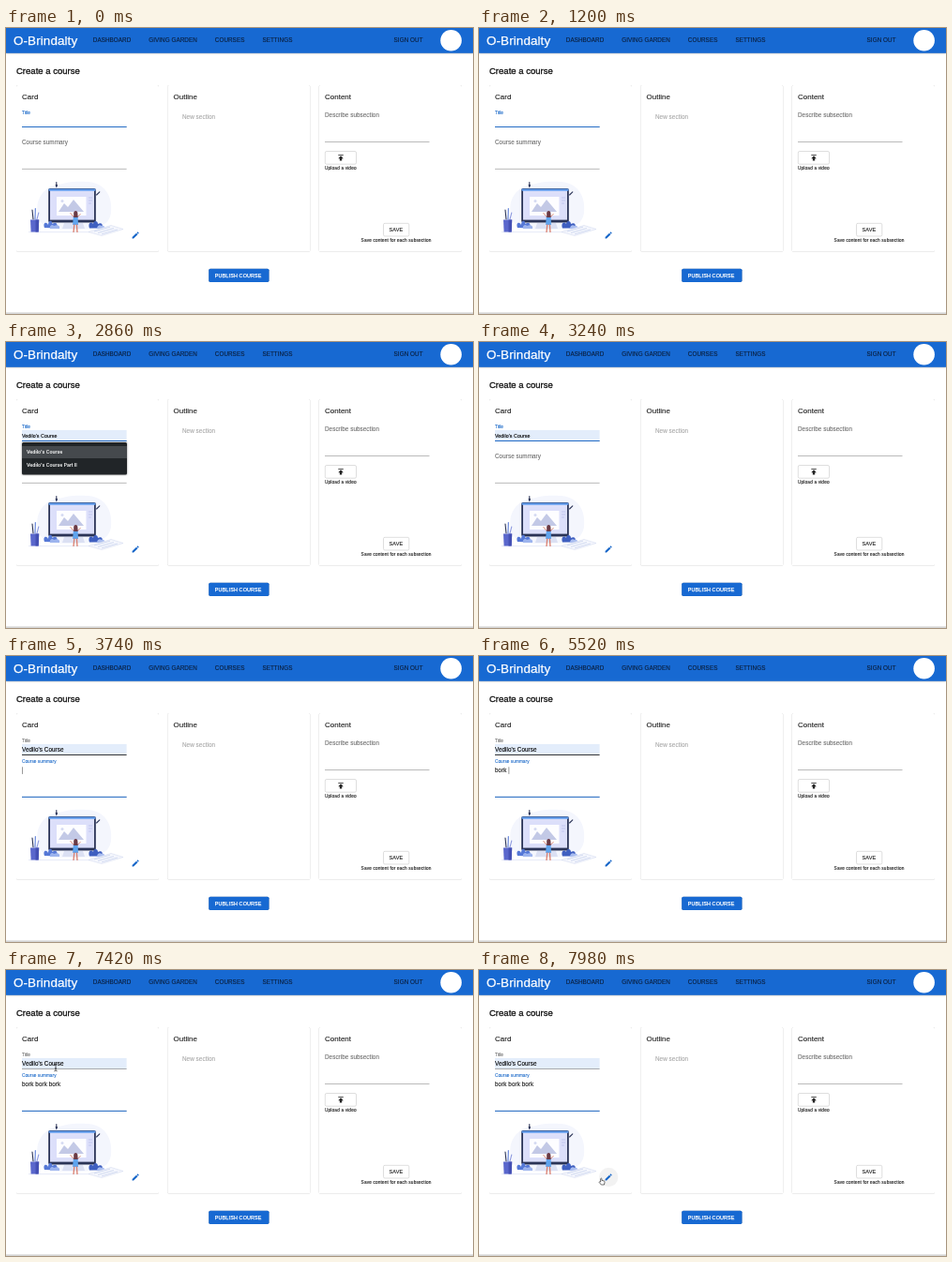
Recreate the animation shown at these times as an HTML page. Size 498 by 305 pixels, loop 8 s.

```html
<!DOCTYPE html>
<html lang="en">
<head>
<meta charset="utf-8">
<title>Create a course</title>
<style>
  html, body { margin: 0; width: 100%; height: 100%; overflow: hidden; background: #fff; }
  svg { display: block; width: 100%; height: 100%; }
  text {
    font: 6.32px "Liberation Sans", Arial, sans-serif; letter-spacing: .06px; white-space: pre;
    color: #1c1c1c; fill: currentColor; stroke: currentColor; stroke-width: .12px;
  }
  .nav text { color: #0b1f3d; }
  .nav .brand { font-size: 13.43px; letter-spacing: .1px; color: #fff; stroke-width: .25px; }
  .h1 { font-size: 9.48px; letter-spacing: .03px; color: #111; stroke-width: .28px; }
  .h2 { font-size: 7.9px; }
  .label { color: #707070; }
  .small { font-size: 4.74px; letter-spacing: .045px; }
  .hint { color: #a8a8a8; }
  .caption { font-size: 4.74px; letter-spacing: .16px; }
  .button { font-size: 5.53px; letter-spacing: .16px; }
  .publish { font-size: 5.4px; letter-spacing: .155px; color: #fff; stroke-width: .25px; }
  .menu text { font: 500 5.1px Inter, Roboto, sans-serif; letter-spacing: 0; color: #fff; }
  .card { fill: #fff; filter: drop-shadow(0 .6px .6px rgba(0,0,0,.3)); }
  .outlined { fill: #fff; stroke: #bdbdbd; stroke-width: .5; }
  .rule { stroke: #8c8c8c; stroke-width: .6; }
  .focus { stroke: #1565c8; stroke-width: .9; }
  .caret { stroke: #333; stroke-width: .5; }
</style>
</head>
<body>
<svg viewBox="0 0 498 305" preserveAspectRatio="none">
  <rect width="498" height="305" fill="#fff"/>
  <rect y="303.6" width="498" height="1" fill="#b8b8b8"/>

  <g class="nav">
    <rect width="498" height="26.8" fill="#1769d2" style="filter:drop-shadow(0 .8px 1.1px rgba(0,0,0,.38))"/>
    <text class="brand" x="8" y="18.2">O-Brindalty</text>
    <text x="92.8" y="15.4">DASHBOARD</text>
    <text x="152.2" y="15.4">GIVING GARDEN</text>
    <text x="222.8" y="15.4">COURSES</text>
    <text x="273.4" y="15.4">SETTINGS</text>
    <text x="413.6" y="15.4">SIGN OUT</text>
    <circle cx="474.6" cy="13.3" r="11.3" fill="#fff"/>
  </g>

  <text class="h1" x="11" y="48.8">Create a course</text>
  <rect class="card" x="11" y="61" width="152" height="177.5" rx="1.6"/>
  <rect class="card" x="172.3" y="61" width="152" height="177.5" rx="1.6"/>
  <rect class="card" x="333.7" y="61" width="152.3" height="177.5" rx="1.6"/>
  <text class="h2" x="17" y="76.2">Card</text>
  <text class="h2" x="178.6" y="76.2">Outline</text>
  <text class="h2" x="340" y="76.2">Content</text>

  <text class="hint" x="188" y="97">New section</text>

  <text class="label" x="340" y="95">Describe subsection</text>
  <path class="rule" d="M340 121.5H451.5"/>
  <rect class="outlined" x="340.3" y="131.5" width="33.2" height="13.7" rx="1.5"/>
  <path transform="translate(352.3 133.6) scale(.395)" fill="#222" d="M5 4v2h14V4zM5 14h4v6h6v-6h4l-7-7z"/>
  <text class="caption" x="340" y="151.4">Upload a video</text>
  <rect class="outlined" x="402.5" y="208.3" width="27.3" height="13.7" rx="1.5"/>
  <text class="button" x="408.5" y="217.2">SAVE</text>
  <text class="caption" x="378.6" y="228.2">Save content for each subsection</text>

  <rect x="216.2" y="256.7" width="64.3" height="14.2" rx="1.6" fill="#1769d2" style="filter:drop-shadow(0 .6px .6px rgba(0,0,0,.38))"/>
  <text class="publish" x="222.8" y="265.7">PUBLISH COURSE</text>

  <g id="art">
    <path fill="#f4f6fd" d="M34 199C31 184 38 172 52 168C66 164 72 163 88 164C106 166 114 180 112 197C110 211 98 215 72 215C48 215 36 213 34 199Z"/>
    <path stroke="#dfe5f5" stroke-width=".8" d="M24 217.6H112"/>
    <path fill="#dbe0f3" d="M62 208H82L84 214H60Z"/>
    <rect x="45.2" y="171" width="50.6" height="36.6" rx="1.8" fill="#2b3457"/>
    <rect x="47" y="173" width="47" height="31.6" fill="#dcdffa"/>
    <path fill="#5f9bec" d="M45.6 171.4H95.4V173.8H45.6Z"/>
    <rect x="54" y="180" width="31.5" height="20" fill="#fdfdff"/>
    <path fill="#c3c9e6" d="M56 196L62 187L66 191L72 183L83 196Z"/>
    <circle cx="60" cy="184.5" r="1.5" fill="#d5daf2"/>
    <path stroke="#b3bbe8" stroke-width=".7" d="M88 181H92M88 184H92M88 187H91"/>
    <path fill="#5578d6" d="M41 213C39 208 43 206 45 210C45 205 49 204 49.5 209C53 206 56 209 54 213.5Z"/>
    <path fill="#9db4ee" d="M47 214C46 210 50 209 51 211C55 209 58 211 57 214Z"/>
    <path fill="#3f5fc0" d="M89 213.5C87 208 91 206 93 209C93 205 98 205 98 209C102 207 104 210 102 213.5Z"/>
    <path fill="#a9bdf0" d="M97 214C97 211 100 209 102 211C104 210 106 212 105 214Z"/>
    <path fill="#f5f7fd" stroke="#ccd4ec" stroke-width=".5" d="M88 217.5L112 210.5L125 214.5L102 221.5Z"/>
    <path stroke="#c9d3ee" stroke-width=".8" d="M94 217L111 212.2M98 218.5L115 213.6M102 219.8L119 214.9"/>
    <g stroke-linecap="round" stroke-width="1.1">
      <path stroke="#2b3457" d="M29 204L28 194M53.8 164.5V169"/>
      <path stroke="#5578d6" d="M31 204L31.3 192.5"/>
      <path stroke="#8f9be0" d="M33 204L34.8 197"/>
      <path stroke="#2b3457" d="M96.6 178L99.8 174.8"/>
    </g>
    <path fill="#2b3457" d="M52.5 167H55.1L53.8 170.6Z"/>
    <path fill="#5a67cc" d="M26 204.5H35.2L34.7 217.5H26.6Z"/>
    <path fill="#4450b4" d="M31.5 204.5H35.2L34.7 217.5H31.5Z"/>
    <path stroke="#e0937f" stroke-width="1" fill="none" d="M72.5 202L68.5 197M76 202L79.5 198"/>
    <path fill="#5fa4ee" d="M71.8 201H76.6L77 210H71.2Z"/>
    <path stroke="#d97f70" stroke-width="1.3" d="M72.8 209.5L72 218M75.4 209.5L76 218"/>
    <path fill="#6b3a44" d="M72.2 197.5C72 194 76.6 194 76.4 197.5L76.7 202H72.2Z"/>
  </g>

  <circle id="halo" cx="138.2" cy="221" r="10.2" fill="#000"/>
  <path transform="translate(133.4 216.2) scale(.395)" fill="#1565c8" d="M3 17.25V21h3.75L17.81 9.94l-3.75-3.75zM20.71 7.04c.39-.39.39-1.02 0-1.41l-2.34-2.34c-.39-.39-1.02-.39-1.41 0l-1.83 1.83 3.75 3.75z"/>

  <rect id="fill" x="17" y="94" width="111.6" height="11.5" fill="#e3edfb"/>
  <text id="titleLabel" class="label small" x="17" y="92">Title</text>
  <text id="titleText" x="17" y="102.1"></text>
  <path id="titleRule" class="rule" d="M17 105.5H128.6"/>
  <path id="titleFocus" class="focus"/>
  <text id="sumLabel" class="label">Course summary</text>
  <text id="sumText" x="17" y="123.8"></text>
  <path class="rule" d="M17 150.4H128.6"/>
  <path id="sumFocus" class="focus"/>
  <path id="caret" class="caret"/>

  <g id="menu" class="menu">
    <rect x="17" y="107" width="112" height="34.5" rx="1.5" fill="#212528" style="filter:drop-shadow(0 .8px 1.2px rgba(0,0,0,.4))"/>
    <rect id="choice" x="17" y="111" width="112" height="13" fill="#45494d"/>
    <text x="22" y="119">Vedilo's Course</text>
    <text x="22" y="133.2">Vedilo's Course Part II</text>
  </g>

  <g id="pointer" stroke-linejoin="round">
    <path id="beam" fill="none" stroke="#222" stroke-width=".7" d="M-1.7-3.8Q0-3.8 0-2.8Q0-3.8 1.7-3.8M0-2.8V2.8M-1.7 3.8Q0 3.8 0 2.8Q0 3.8 1.7 3.8M-1 1H1"/>
    <path id="arrow" fill="#111" stroke="#fff" stroke-width=".5" d="M0-3V3.8L1.6 2.3L2.7 4.8L3.8 4.3L2.7 1.9H4.9Z"/>
    <path id="hand" fill="#fff" stroke="#111" stroke-width=".6" d="M-1.3 1V-2.4Q-.7-3.4 0-2.4V-.6L2.4 0Q3.2.3 3 1.2L2.5 4H-.7L-2.9 1.3Q-2.6.2-1.3 1Z"/>
  </g>
</svg>
<script>
const LOOP = 8000, LEFT = 17, RIGHT = 128.6;
const BLUE = '#1565c8', GRAY = '#707070';
const FOCUS_SUMMARY = 3560;
const $ = id => document.getElementById(id);

const titleKeys = [1300, 1640, 1780, 1940, 2060, 2260, 2400, 2520];
const summaryKeys = [4600, 4780, 4940, 5100, 5300, 5620, 5760, 5900, 6040, 6200, 6380, 6520, 6660, 6800];
const path = [[7380, 53, 104], [7440, 53, 104], [7600, 100, 146], [7760, 160, 203], [7880, 140, 221], [7960, 131, 225]];

const clamp = x => Math.max(0, Math.min(1, x));
const easeOut = x => 1 - (1 - clamp(x)) ** 3;
const mix = (a, b, k) => a + (b - a) * k;
const show = (id, on) => { $(id).style.display = on ? '' : 'none'; };
const typed = (text, keys, t) => text.slice(0, keys.filter(k => k <= t).length);

function drawFocus(id, y, k) {
  const mid = (LEFT + RIGHT) / 2, half = (RIGHT - LEFT) / 2 * k;
  $(id).setAttribute('d', `M${mid - half} ${y}H${mid + half}`);
  show(id, k > 0);
}

function drawCaret(t, inSummary) {
  const keys = inSummary ? [FOCUS_SUMMARY + 20, ...summaryKeys] : [260, ...titleKeys, 3300];
  const last = keys.filter(k => k <= t).pop();
  const hidden = t >= 2860 && t < 3300 || t >= 7300;
  show('caret', last !== undefined && !hidden && (t - last) % 1000 < 500);
  const text = $(inSummary ? 'sumText' : 'titleText');
  const x = LEFT + .5 + (text.textContent ? text.getComputedTextLength() : 0);
  $('caret').setAttribute('d', `M${x} ${inSummary ? 118.3 : 96.3}v7.6`);
}

function drawPointer(t) {
  const visible = t >= path[0][0];
  show('pointer', visible);
  $('halo').style.opacity = .05 * clamp((t - 7840) / 130);
  if (!visible) return;
  const i = path.findIndex(p => p[0] > t);
  const b = path.at(i), a = i < 0 ? b : path[i - 1];
  const k = i < 0 ? 0 : (t - a[0]) / (b[0] - a[0]);
  const x = mix(a[1], b[1], k), y = mix(a[2], b[2], k);
  $('pointer').setAttribute('transform', `translate(${x} ${y})`);
  const overField = x < RIGHT && y < 151;
  const overIcon = Math.hypot(x - 138.2, y - 221) < 10.2;
  show('beam', overField);
  show('hand', overIcon);
  show('arrow', !overField && !overIcon);
}

function render(t) {
  const inSummary = t >= FOCUS_SUMMARY;
  const k = easeOut((t - FOCUS_SUMMARY) / 170);
  const preview = t >= 2860 && t < 3300;

  $('titleText').textContent = t >= 2860 ? "Vedilo's Course" : typed("Vedilo's", titleKeys, t);
  $('titleText').style.fontSize = preview ? '5.3px' : '';
  $('titleText').style.color = t >= 2860 ? '#000' : '';
  $('sumText').textContent = typed('bork bork bork', summaryKeys, t);
  show('fill', t >= 2860);
  show('menu', t >= 1640 && t < 3240);
  show('choice', t >= 2860);

  $('titleLabel').style.color = inSummary ? GRAY : BLUE;
  $('sumLabel').style.color = inSummary ? BLUE : GRAY;
  $('sumLabel').setAttribute('transform', `translate(${LEFT} ${mix(124.3, 114, k)}) scale(${mix(1, .75, k)})`);
  const hovered = inSummary && t < 7400;
  $('titleRule').style.stroke = hovered ? '#222' : '#777';
  $('titleRule').style.strokeWidth = hovered ? .9 : .6;
  drawFocus('titleFocus', 105.5, 1 - k);
  drawFocus('sumFocus', 150.4, k);
  drawCaret(t, inSummary);
  drawPointer(t);
}

let start;
function tick(now) {
  start ??= now;
  render((now - start) % LOOP);
  requestAnimationFrame(tick);
}
render(0);
requestAnimationFrame(tick);
</script>
</body>
</html>
```
